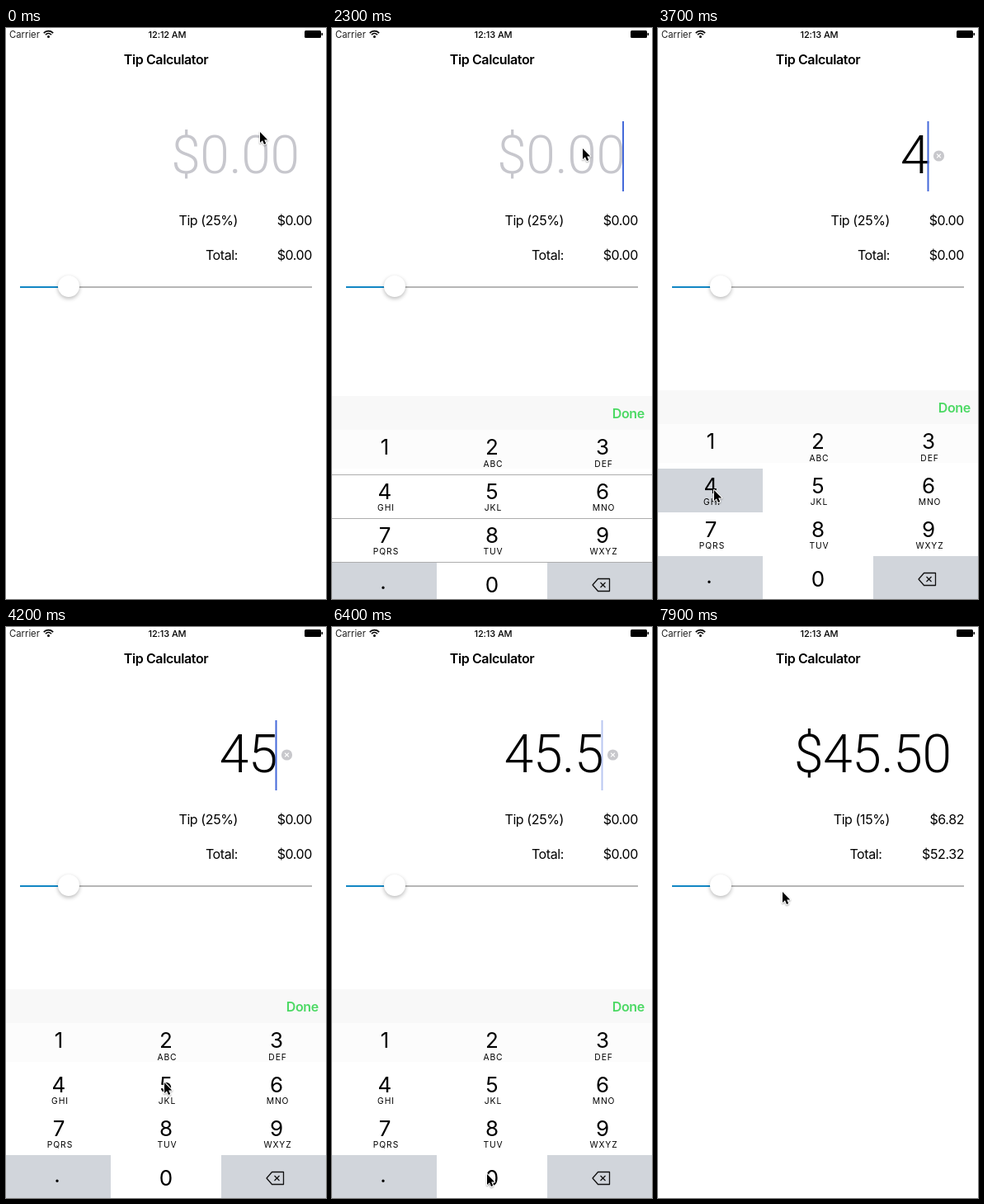
Animation of 388x692 px, one loop 8 s. Source, as an HTML page with a canvas:

```html
<!DOCTYPE html>
<html lang="en">
<head>
<meta charset="utf-8">
<title>Tip Calculator</title>
<style>
html, body { margin: 0; width: 100%; height: 100%; overflow: hidden; background: #fff; }
canvas { display: block; }
</style>
</head>
<body>
<canvas id="stage" width="388" height="692"></canvas>
<script>
const ctx = document.getElementById('stage').getContext('2d');
const LOOP = 8000, OPEN = 2000, CLOSE = 7430, KEYS_H = 253;
const UI = 'Inter, "Liberation Sans", sans-serif';
const BIG = 'Roboto, "Liberation Sans", sans-serif';
const GRAY = '#d1d5db';
const COLS = [0, 127, 261, 388], ROWS = [480, 534, 587, 640, 692];
const CENTERS = [64, 194, 328];
const LETTERS = ['', 'ABC', 'DEF', 'GHI', 'JKL', 'MNO', 'PQRS', 'TUV', 'WXYZ'];

// Key presses: down time, release time, column, row, resulting entry
const PRESSES = [
  [3600, 3760, 0, 1, '4'],
  [4020, 4160, 1, 1, '45'],
  [5050, 5200, 0, 3, '45.'],
  [5840, 5940, 1, 1, '45.5'],
  [6450, 6600, 1, 3, '45.50']
];

// Pointer tip: time, x, y
const PATH = [
  [0, 308, 126], [250, 308, 126], [1100, 304, 146], [2400, 304, 146],
  [3100, 175, 443], [3500, 68, 560], [3780, 68, 560], [4000, 192, 552],
  [4230, 192, 552], [4650, 78, 666], [5230, 78, 666], [5720, 194, 556],
  [5880, 193, 560], [6100, 188, 663], [6550, 188, 663], [7150, 360, 462],
  [7430, 360, 462], [7700, 207, 339], [7800, 207, 339], [7900, 151, 321]
];

const clamp = v => Math.max(0, Math.min(1, v));

// Remaining share of a critically damped spring
function spring(ms) {
  const s = Math.max(0, ms) * 0.01826;
  return (1 + s) * Math.exp(-s);
}

function rect(x, y, w, h, color) {
  ctx.fillStyle = color;
  ctx.fillRect(x, y, w, h);
}

function disc(x, y, r, color) {
  ctx.fillStyle = color;
  ctx.beginPath();
  ctx.arc(x, y, r, 0, Math.PI * 2);
  ctx.fill();
}

function polyline(points, closed) {
  ctx.beginPath();
  points.forEach(([x, y]) => ctx.lineTo(x, y));
  if (closed) ctx.closePath();
}

function cross(x, y, r) {
  for (const d of [-r, r]) {
    polyline([[x - r, y - d], [x + r, y + d]]);
    ctx.stroke();
  }
}

function text(str, x, y, size, { align = 'left', weight = 400, color = '#000', family = UI, track = 0 } = {}) {
  ctx.font = `${weight} ${size}px ${family}`;
  ctx.letterSpacing = track + 'px';
  ctx.textAlign = align;
  ctx.fillStyle = color;
  ctx.fillText(str, x, y);
}

function statusBar(t) {
  text('Carrier', 4, 12, 11.3, { color: '#222' });
  ctx.strokeStyle = '#000';
  ctx.lineWidth = 1.7;
  for (const r of [4.8, 7.8]) {
    ctx.beginPath();
    ctx.arc(51.5, 11.5, r, -Math.PI * 0.76, -Math.PI * 0.24);
    ctx.stroke();
  }
  disc(51.5, 10.4, 1.5, '#000');
  text(t < OPEN ? '12:12 AM' : '12:13 AM', 195.5, 12, 11, { align: 'center', weight: 500, track: -0.1 });
  ctx.fillStyle = '#000';
  ctx.beginPath();
  ctx.roundRect(362, 3, 20, 9, 1.5);
  ctx.fill();
  rect(382.5, 6, 1.5, 3, '#000');
}

function amount(t) {
  const last = PRESSES.filter(p => p[0] <= t).pop();
  const editing = t >= OPEN && t < CLOSE;
  const typing = editing && last;
  const str = typing ? last[4] : last ? '$45.50' : '$0.00';
  text(str, typing ? 329 : 355.5, 176, 64, {
    align: 'right', weight: 300, family: BIG, track: -0.4, color: last ? '#000' : '#c7c7cd'
  });
  if (typing) {
    disc(340.5, 155, 6.6, '#c8c8cc');
    ctx.strokeStyle = '#fff';
    ctx.lineWidth = 1.2;
    cross(340.5, 155, 2.4);
  }
  if (editing) {
    const since = t - (last ? last[0] : OPEN);
    ctx.globalAlpha = clamp(0.5 + 2 * Math.sin(since / 1100 * Math.PI * 2));
    rect(typing ? 326.5 : 352, 113, 2, 85, '#4469da');
    ctx.globalAlpha = 1;
  }
}

function summary(t) {
  const done = t >= CLOSE;
  const row = (str, x, y) => text(str, x, y, 16, { align: 'right', track: -0.4 });
  row(done ? 'Tip (15%)' : 'Tip (25%)', 281, 239);
  row(done ? '$6.82' : '$0.00', 371, 239);
  row('Total:', done ? 271.5 : 281, 281);
  row(done ? '$52.32' : '$0.00', 371, 281);

  rect(17, 313, 354, 2, '#b6b6b6');
  rect(17, 313, 59, 2, '#1287c4');
  ctx.save();
  ctx.shadowColor = 'rgba(0,0,0,.28)';
  ctx.shadowBlur = 5;
  ctx.shadowOffsetY = 2;
  disc(76, 313, 13, '#fff');
  ctx.restore();
}

function keyboard(t) {
  if (t < OPEN || t >= 7700) return;
  const offset = KEYS_H * (t < CLOSE ? spring(t - OPEN) : 1 - spring(t - CLOSE));
  ctx.save();
  ctx.translate(0, t > 2500 && t < CLOSE ? 0 : Math.round(offset));
  rect(0, 439, 388, KEYS_H, '#fff');
  rect(0, 439, 388, 41, '#f8f8f8');
  rect(0, 480, 388, 47, '#fcfcfc');
  text('Done', 379, 465.5, 16, { align: 'right', weight: 600, color: '#4cd964', track: -0.3 });

  const pressed = PRESSES.find(p => t >= p[0] && t < p[1]);
  for (let r = 0; r < 4; r++) {
    for (let c = 0; c < 3; c++) {
      const side = r === 3 && c !== 1;
      const down = pressed && pressed[2] === c && pressed[3] === r;
      if (side !== Boolean(down)) {
        rect(COLS[c], ROWS[r], COLS[c + 1] - COLS[c], ROWS[r + 1] - ROWS[r], GRAY);
      }
      if (r < 3) {
        const n = r * 3 + c, y = [510, 563.5, 616.5][r];
        text(n + 1, CENTERS[c], y, 26, { align: 'center' });
        text(LETTERS[n], CENTERS[c] + 1.5, y + 14.5, 10.3, { align: 'center', track: 0.9 });
      }
    }
  }
  text('0', 194, 676.5, 26, { align: 'center' });
  text('.', 62, 673, 26, { align: 'center' });

  ctx.strokeStyle = '#111';
  ctx.lineWidth = 1.3;
  ctx.lineJoin = 'round';
  polyline([[316, 668], [322.5, 660.5], [336.5, 660.5], [336.5, 675.5], [322.5, 675.5]], true);
  ctx.stroke();
  cross(328.5, 668, 3);

  if (t < 2450) ROWS.slice(1, 4).forEach(y => rect(0, y, 388, 1, '#adadad'));
  ctx.restore();
}

function pointer(t) {
  const next = PATH.findIndex(p => p[0] > t);
  const b = PATH[next < 0 ? PATH.length - 1 : next];
  const a = next < 0 ? b : PATH[next - 1];
  const u = clamp((t - a[0]) / (b[0] - a[0] || 1));
  const k = u * u * (3 - 2 * u);
  ctx.save();
  ctx.translate(a[1] + (b[1] - a[1]) * k, a[2] + (b[2] - a[2]) * k);
  polyline([[0, 0], [0, 13], [3, 10.3], [5, 15], [7.2, 14], [5.2, 9.5], [9.2, 9.5]], true);
  ctx.lineJoin = 'round';
  ctx.lineWidth = 2;
  ctx.strokeStyle = '#fff';
  ctx.shadowColor = 'rgba(0,0,0,.35)';
  ctx.shadowBlur = 2;
  ctx.shadowOffsetY = 1;
  ctx.stroke();
  ctx.shadowColor = 'transparent';
  ctx.fillStyle = '#000';
  ctx.fill();
  ctx.restore();
}

function draw(now) {
  const t = now % LOOP;
  rect(0, 0, 388, 692, '#fff');
  statusBar(t);
  text('Tip Calculator', 194, 43.5, 16, { align: 'center', weight: 600, track: -0.4 });
  amount(t);
  summary(t);
  keyboard(t);
  pointer(t);
}

const start = performance.now();
function tick() {
  draw(performance.now() - start);
  requestAnimationFrame(tick);
}
tick();
</script>
</body>
</html>
```
